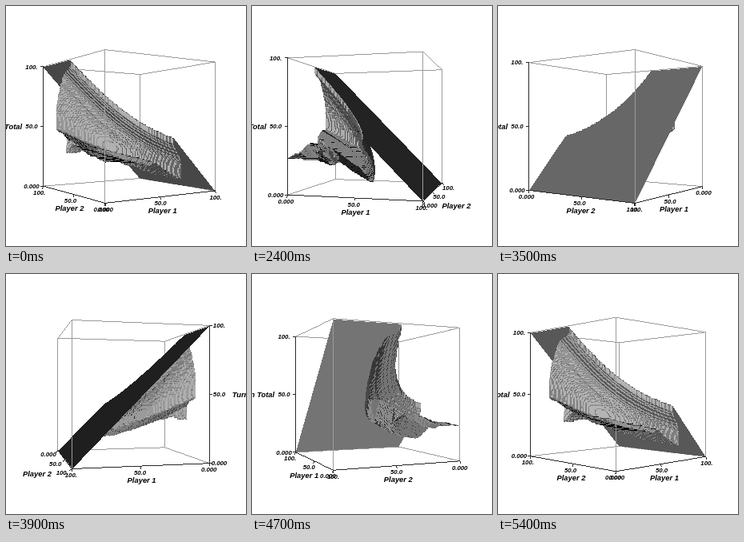
Recreate the animation shown at these times as an HTML page with a canvas. Size 300 by 300 pixels, loop 5.5 s.

```html
<!DOCTYPE html>
<html lang="en">
<head>
<meta charset="utf-8">
<title>Optimal dice play</title>
<style>
  html, body { margin: 0; width: 100%; height: 100%; overflow: hidden; background: #fff; }
  canvas { display: block; width: 300px; height: 300px; }
</style>
</head>
<body>
<canvas id="stage" width="300" height="300"></canvas>
<script>
const start = performance.now();
const SIZE = 300, GOAL = 100, N = GOAL + 1;
const LOOP = 5500, HOLD = 2000, STEP = 100;
const FOCAL = 560, DIST = 7.23, CX = 150, CY = 150.5;
const GREY = 180;
const FONT = '"Liberation Sans", Arial, sans-serif';

// --- Two dice: a single 1 loses the turn, a pair of 1s gives 25, other pairs count double.
const gains = new Map();
let bust = 0;
for (let a = 1; a <= 6; a++)
  for (let b = 1; b <= 6; b++) {
    if (a !== b && (a === 1 || b === 1)) {
      bust += 1 / 36;
      continue;
    }
    const points = a !== b ? a + b : a === 1 ? 25 : 4 * a;
    gains.set(points, (gains.get(points) || 0) + 1 / 36);
  }

// --- Best play: roll[i, j, k] is 1 where rolling beats holding.
const at = (i, j, k) => (i * N + j) * N + k;

function solveGame() {
  const roll = new Uint8Array(N * N * N);
  const win = new Float64Array(GOAL * GOAL);
  const points = [...gains.keys()], chance = [...gains.values()];
  const line = new Float64Array(GOAL + Math.max(...points));

  // Chance to win at the start of a turn, given the rival's chance after a lost turn.
  const turn = (i, j, rival) => {
    line.fill(1, GOAL - i);
    for (let k = GOAL - 1 - i; k >= 0; k--) {
      let go = bust * (1 - rival);
      for (let n = 0; n < points.length; n++) go += chance[n] * line[k + points[n]];
      const stay = 1 - (k ? win[j * GOAL + i + k] : rival);
      roll[at(i, j, k)] = go > stay ? 1 : 0;
      line[k] = Math.max(go, stay);
    }
    return line[0];
  };

  for (let sum = 2 * GOAL - 2; sum >= 0; sum--) {
    for (let i = Math.max(0, sum - GOAL + 1); i <= sum / 2; i++) {
      const j = sum - i;
      let a = 0.5, b = 0.5;
      for (let n = 0; n < 200; n++) {
        const a2 = turn(i, j, b);
        const b2 = i === j ? a2 : turn(j, i, a2);
        const change = Math.abs(a2 - a) + Math.abs(b2 - b);
        a = a2;
        b = b2;
        if (change < 1e-9) break;
      }
      win[i * GOAL + j] = a;
      win[j * GOAL + i] = b;
    }
  }
  for (let i = 0; i < N; i++)
    for (let k = 0; k < N; k++) roll[at(i, GOAL, k)] = roll[at(i, GOAL - 1, k)];
  return roll;
}

// --- Boundary surface: loops of edge midpoints in each mixed cell.
function cellLoops(mask) {
  const inside = c => mask >> c & 1;
  const next = new Map();
  for (let d = 0; d < 3; d++) {
    const p = 1 << (d + 1) % 3, q = 1 << (d + 2) % 3;
    for (const side of [0, 1 << d]) {
      const ring = [0, p, p + q, q].map(c => c + side);
      if (!side) ring.reverse();
      for (let e = 0; e < 4; e++) {
        const a = ring[e], b = ring[(e + 1) % 4];
        if (!inside(a) || inside(b)) continue;
        let f = e + 1;
        while (inside(ring[f % 4]) || !inside(ring[(f + 1) % 4])) f++;
        next.set(a * 8 + b, ring[(f + 1) % 4] * 8 + ring[f % 4]);
      }
    }
  }
  const loops = [];
  while (next.size) {
    const loop = [];
    let key = next.keys().next().value;
    while (next.has(key)) {
      const a = key >> 3, b = key & 7, to = next.get(key);
      loop.push([0, 1, 2].map(n => ((a >> n & 1) + (b >> n & 1)) / 2));
      next.delete(key);
      key = to;
    }
    loops.push(loop);
  }
  return loops;
}

// Each triangle: nine coordinates in -1..1, then the level part of its normal.
function buildMesh(roll) {
  const cases = [], mesh = [];
  const unit = v => v / (GOAL / 2) - 1;
  for (let i = 0; i < GOAL; i++)
    for (let j = 0; j < GOAL; j++)
      for (let k = 0; k < GOAL - i; k++) {
        let mask = 0;
        for (let c = 0; c < 8; c++)
          mask |= roll[at(i + (c & 1), j + (c >> 1 & 1), k + (c >> 2))] << c;
        if (mask === 0 || mask === 255) continue;
        for (const loop of cases[mask] ||= cellLoops(mask)) {
          const [a] = loop;
          for (let n = 2; n < loop.length; n++) {
            const b = loop[n - 1], c = loop[n];
            const u = b.map((v, m) => v - a[m]), w = c.map((v, m) => v - a[m]);
            const nx = u[1] * w[2] - u[2] * w[1];
            const ny = u[2] * w[0] - u[0] * w[2];
            const nz = u[0] * w[1] - u[1] * w[0];
            const len = Math.hypot(nx, ny, nz);
            if (!len) continue;
            for (const v of [a, b, c])
              mesh.push(unit(i + v[0]), unit(j + v[1]), unit(k + v[2]));
            mesh.push(nx / len, ny / len);
          }
        }
      }
  return new Float32Array(mesh);
}

// --- Drawing
const ctx = document.getElementById("stage").getContext("2d");
const image = ctx.createImageData(SIZE, SIZE);
const pixels = new Uint32Array(image.data.buffer);
const depth = new Float32Array(SIZE * SIZE);
const mesh = buildMesh(solveGame());
const rgb = v => (0xff000000 | v << 16 | v << 8 | v) >>> 0;
let cos = 1, sin = 0;

// Returns x, y and the scale, which grows towards the viewer.
function project(x, y, z) {
  const s = FOCAL / (DIST + x * sin + y * cos);
  return [CX + (x * cos - y * sin) * s, CY - z * s, s];
}

function fillTriangle([ax, ay, as], [bx, by, bs], [cx, cy, cs], color) {
  const area = (bx - ax) * (cy - ay) - (by - ay) * (cx - ax);
  if (Math.abs(area) < 1e-6) return;
  const x0 = Math.ceil(Math.min(ax, bx, cx) - 0.5), x1 = Math.max(ax, bx, cx) - 0.5;
  const y0 = Math.ceil(Math.min(ay, by, cy) - 0.5), y1 = Math.max(ay, by, cy) - 0.5;
  for (let y = y0; y <= y1; y++)
    for (let x = x0; x <= x1; x++) {
      const px = x + 0.5, py = y + 0.5;
      const u = ((cx - bx) * (py - by) - (cy - by) * (px - bx)) / area;
      const v = ((ax - cx) * (py - cy) - (ay - cy) * (px - cx)) / area;
      const w = 1 - u - v;
      if (u < -1e-4 || v < -1e-4 || w < -1e-4) continue;
      const s = u * as + v * bs + w * cs, o = y * SIZE + x;
      if (s > depth[o]) {
        depth[o] = s;
        pixels[o] = color;
      }
    }
}

function drawSurface() {
  for (let o = 0; o < mesh.length; o += 11) {
    const light = Math.abs(mesh[o + 9] * sin + mesh[o + 10] * cos);
    fillTriangle(
      project(mesh[o], mesh[o + 1], mesh[o + 2]),
      project(mesh[o + 3], mesh[o + 4], mesh[o + 5]),
      project(mesh[o + 6], mesh[o + 7], mesh[o + 8]),
      rgb(Math.round(GREY * light)));
  }
}

function drawLine(a, b, color, onTop) {
  const n = Math.ceil(Math.max(Math.abs(b[0] - a[0]), Math.abs(b[1] - a[1]), 1));
  for (let m = 0; m <= n; m++) {
    const [x, y, s] = a.map((v, c) => v + (b[c] - v) * m / n);
    const o = Math.floor(y) * SIZE + Math.floor(x);
    if (onTop || s * 1.002 > depth[o]) pixels[o] = color;
  }
}

const CORNERS = [[0, 0], [1, 0], [1, 1], [0, 1]];
const LABELS = ["0.000", "50.0", "100."];

function layoutAxes(floor, roof) {
  const front = floor.reduce((best, p, n) => p[2] > floor[best][2] ? n : best, 0);
  const left = (front + 3) % 4, right = (front + 1) % 4;
  const corner = ([x, y]) => Math.hypot(x, SIZE - y);
  const side = corner(floor[front]) < corner(floor[left]) ? right : left;

  const level = end => {
    const which = CORNERS[front][0] !== CORNERS[end][0] ? 0 : 1;
    const [from, to] = CORNERS[front][which] ? [end, front] : [front, end];
    const p = floor[from], q = floor[to];
    const dx = q[0] - p[0], dy = q[1] - p[1];
    const turn = (dx < 0 ? -1 : 1) / Math.hypot(dx, dy);
    const out = [-dy * turn, dx * turn];
    const shift = [Math.sign(out[0]) * 50 * Math.abs(out[0]) ** 1.5, 18];
    return { p, q, out, shift, title: "Player " + (which + 1) };
  };
  const dir = side === left ? -1 : 1;
  const upright = {
    p: floor[side], q: roof[side], out: [dir, 0], shift: [dir * 50, 1], title: "Turn Total"
  };
  return [level(left), level(right), upright];
}

const along = (axis, f) => [0, 1].map(c => axis.p[c] + (axis.q[c] - axis.p[c]) * f);

function drawAxisLines(axis) {
  const ink = rgb(40);
  drawLine(axis.p, axis.q, ink, true);
  for (const f of [0, 0.5, 1]) {
    const a = along(axis, f);
    drawLine(a, a.map((v, c) => v + axis.out[c] * 3), ink, true);
  }
}

function drawAxisText(axis) {
  const { out, shift, title } = axis;
  ctx.font = "italic bold 7.8px " + FONT;
  LABELS.forEach((text, n) => {
    const [x, y] = along(axis, n / 2);
    ctx.fillText(text, x + out[0] * 13.3 - 1.2, y + out[1] * 8 + 0.6);
  });
  const [x, y] = along(axis, 0.5);
  ctx.font = "italic bold 9.4px " + FONT;
  ctx.fillText(title, x + shift[0] + 1, y + shift[1]);
}

function draw(step) {
  const angle = (33.9 - 10 * step) * Math.PI / 180;
  cos = Math.cos(angle);
  sin = Math.sin(angle);
  pixels.fill(rgb(255));
  depth.fill(0);
  drawSurface();

  const ring = z => CORNERS.map(([x, y]) => project(2 * x - 1, 2 * y - 1, z));
  const floor = ring(-1), roof = ring(1), edge = rgb(155);
  for (let n = 0; n < 4; n++) {
    const m = (n + 1) % 4;
    drawLine(floor[n], floor[m], edge);
    drawLine(roof[n], roof[m], edge);
    drawLine(floor[n], roof[n], edge);
  }
  const axes = layoutAxes(floor, roof);
  axes.forEach(drawAxisLines);
  ctx.putImageData(image, 0, 0);

  ctx.fillStyle = "#000";
  ctx.textAlign = "center";
  ctx.textBaseline = "middle";
  axes.forEach(drawAxisText);
}

// One long rest, then a turn of ten degrees every step.
let shown = -1;
function tick() {
  const t = (performance.now() - start) % LOOP;
  const step = t < HOLD ? 0 : Math.floor((t - HOLD) / STEP) + 1;
  if (step !== shown) draw(shown = step);
  requestAnimationFrame(tick);
}
tick();
</script>
</body>
</html>
```
